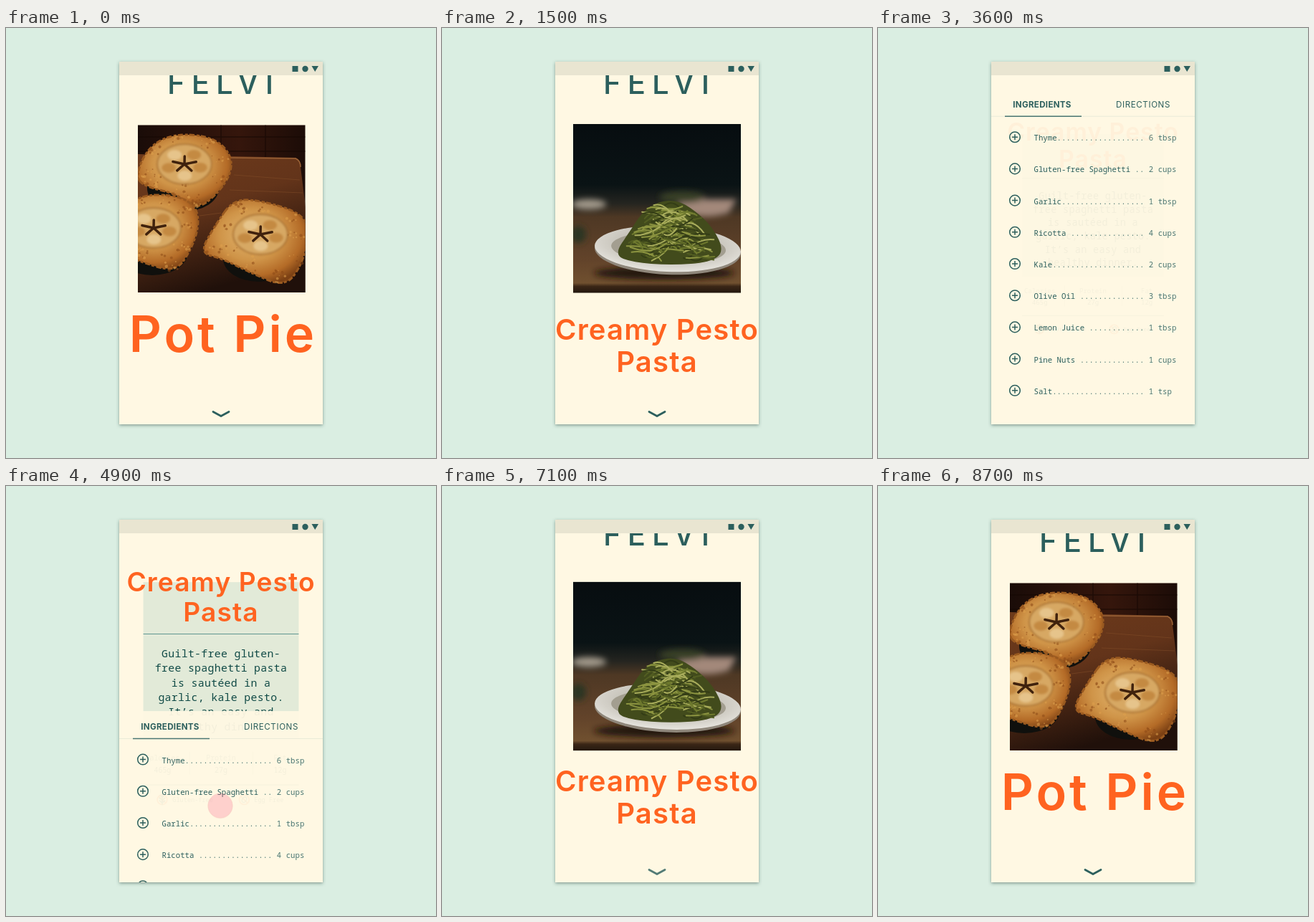
An HTML page that plays this animation: 600 by 600 pixels, repeating every 8800 ms.

```html
<!DOCTYPE html>
<html lang="en">
<head>
<meta charset="utf-8">
<title>Recipe app</title>
<style>
@property --page { syntax: "<number>"; inherits: true; initial-value: 0; }
@property --scroll { syntax: "<number>"; inherits: true; initial-value: 0; }
@property --open { syntax: "<number>"; inherits: true; initial-value: 0; }

html, body { margin: 0; width: 100%; height: 100%; overflow: hidden; background: #daeee2; }
svg.stage {
  display: block; width: 600px; height: 600px;
  --settle: cubic-bezier(.15, .6, .2, 1);
  --tint: clamp(0, var(--open) * 3, 1);
  --shrink: calc(1 - .163 * var(--open));
  animation: page 8.8s linear infinite, scroll 8.8s linear infinite, open 8.8s linear infinite;
}

@keyframes page {
  0%, 2.84% { --page: 0; }
  6.25% { --page: .6; animation-timing-function: var(--settle); }
  15.91%, 86.36% { --page: 1; }
  89.77% { --page: .4; animation-timing-function: var(--settle); }
  98.3%, 100% { --page: 0; }
}
@keyframes scroll {
  0%, 19.89% { --scroll: 0; }
  23.3% { --scroll: .35; animation-timing-function: var(--settle); }
  29.32%, 71.02% { --scroll: 1; }
  72.73% { --scroll: .9375; }
  75.57% { --scroll: .5; animation-timing-function: var(--settle); }
  82.95%, 100% { --scroll: 0; }
}
@keyframes open {
  0% { --open: 0; }
  32.39% { --open: 0; animation-timing-function: cubic-bezier(.3, 0, .1, 1); }
  44.32%, 51.7% { --open: 1; }
  55.68% { --open: .449; animation-timing-function: var(--settle); }
  64.77%, 100% { --open: 0; }
}
@keyframes touch {
  0%, 1.14% { transform: translate(400px, 388px); opacity: 0; }
  2.84% { transform: translate(400px, 388px); opacity: .9; }
  6.25% { transform: translate(215px, 388px); opacity: .8; }
  8.52% { transform: translate(180px, 388px); opacity: 0; }
  18.18% { transform: translate(300px, 488px); opacity: 0; }
  19.89% { transform: translate(300px, 488px); opacity: .9; }
  23.3% { transform: translate(300px, 384px); opacity: .8; }
  25% { transform: translate(300px, 350px); opacity: 0; }
  30.11% { transform: translate(237px, 536px); opacity: 0; }
  31.25%, 32.39% { transform: translate(237px, 536px); opacity: .9; }
  34.09% { transform: translate(237px, 536px); opacity: 0; }
  50% { transform: translate(299px, 198px); opacity: 0; }
  51.7% { transform: translate(299px, 198px); opacity: .9; }
  54.55% { transform: translate(299px, 375px); opacity: .9; }
  55.68% { transform: translate(299px, 446px); opacity: .22; }
  56.25% { transform: translate(299px, 455px); opacity: 0; }
  69.32% { transform: translate(300px, 252px); opacity: 0; }
  71.02% { transform: translate(300px, 252px); opacity: .9; }
  72.73% { transform: translate(300px, 271px); opacity: .92; }
  75.57% { transform: translate(300px, 400px); opacity: .8; }
  77.27% { transform: translate(300px, 440px); opacity: 0; }
  84.09% { transform: translate(268px, 388px); opacity: 0; }
  86.36% { transform: translate(268px, 388px); opacity: .9; }
  88.86% { transform: translate(404px, 388px); opacity: .8; }
  89.77% { transform: translate(453px, 388px); opacity: .2; }
  90.91%, 100% { transform: translate(470px, 388px); opacity: 0; }
}

text { font-family: Inter, sans-serif; font-optical-sizing: none; fill: #2c5f5d; }
.mid { text-anchor: middle; }
.title { font-weight: 600; fill: #ff6320; }
.mono { font-family: "Noto Sans Mono", "DejaVu Sans Mono", monospace; white-space: pre; }
.about { font-size: 16px; font-weight: 500; letter-spacing: .36px; fill: #104a46; }
.small { font-size: 10.7px; font-weight: 500; }
.light { font-weight: 300; fill: #4a7672; }
.tag { font-size: 9.25px; font-weight: 500; }
.ink { fill: none; stroke: #2c5f5d; }

.brand { transform: translateY(calc(var(--scroll) * -297px)); }
.pie-photo { transform: translateX(calc(var(--page) * -308px)); }
.pie-title { transform: translateX(calc(var(--page) * -386px)); }
.card {
  transform: translate(calc((1 - var(--page)) * 308px), calc(var(--scroll) * -12px)) scale(var(--shrink));
  transform-origin: 300px 300px;
}
.pasta-photo { opacity: calc(1.4 - var(--scroll) * 2); }
.pasta-title { transform: translate(calc((1 - var(--page)) * 386px), calc(var(--scroll) * -297px)); }
.pasta-title g { transform: scale(var(--shrink)); transform-origin: 300px 559px; }
.details {
  transform: translateY(calc((1 - var(--scroll)) * 240px)) scale(var(--shrink));
  transform-origin: 300px 244px;
  opacity: calc((var(--scroll) - .7) / .3);
}
.chevron { opacity: calc(1 - var(--scroll) * 6); }
.sheet { transform: translateY(calc(516px - var(--open) * 450px + (1 - var(--scroll)) * 320px)); }
.tabs { opacity: calc((var(--scroll) - .94) / .06); font-size: 10px; letter-spacing: .5px; }
.tab { transform: translate(calc(var(--x) + var(--tint) * var(--dx)), calc(20px + var(--tint) * 2px)) scale(calc(1 + var(--tint) * .16)); }
.bold { font-weight: 700; letter-spacing: .25px; opacity: var(--tint); }
.plain { opacity: calc(1 - var(--tint)); }
.on { opacity: var(--tint); }
.off { opacity: calc(1 - var(--tint)); }
.touch { animation: touch 8.8s linear infinite; }
</style>
</head>
<body>
<svg class="stage" viewBox="0 0 600 600">
  <defs>
    <clipPath id="screen"><rect x="158" y="66" width="284" height="487"/></clipPath>
    <clipPath id="pieFrame"><rect x="184" y="135.5" width="233.5" height="233.5"/></clipPath>
    <clipPath id="pastaFrame"><rect x="183" y="134" width="234" height="235.5"/></clipPath>
    <filter id="shadow" x="-10%" y="-10%" width="120%" height="120%">
      <feDropShadow dx="0" dy="1.5" stdDeviation="2" flood-color="#28463c" flood-opacity=".5"/>
    </filter>
    <filter id="soft" x="-30%" y="-60%" width="160%" height="220%"><feGaussianBlur stdDeviation="4"/></filter>
    <filter id="blur" x="-20%" y="-20%" width="140%" height="140%"><feGaussianBlur stdDeviation="1.6"/></filter>
    <radialGradient id="crust" cx=".46" cy=".42" r=".62">
      <stop offset="0" stop-color="#e3b873"/><stop offset=".5" stop-color="#cf9448"/>
      <stop offset=".8" stop-color="#b46b27"/><stop offset="1" stop-color="#7c4114"/>
    </radialGradient>
    <linearGradient id="board" x1="0" y1="0" x2=".35" y2="1">
      <stop offset="0" stop-color="#6d3a1b"/><stop offset=".45" stop-color="#63341a"/><stop offset="1" stop-color="#20100a"/>
    </linearGradient>
    <linearGradient id="wall" x1="0" x2="1">
      <stop offset="0" stop-color="#1a0c08"/><stop offset=".6" stop-color="#35160c"/><stop offset="1" stop-color="#1c0c07"/>
    </linearGradient>
    <linearGradient id="night" x1="0" y1="0" x2="0" y2="1">
      <stop offset="0" stop-color="#070d10"/><stop offset=".36" stop-color="#0a1315"/><stop offset=".47" stop-color="#252520"/>
      <stop offset=".55" stop-color="#4e3824"/><stop offset=".8" stop-color="#62432a"/><stop offset=".94" stop-color="#70502f"/>
      <stop offset=".96" stop-color="#3a2616"/><stop offset="1" stop-color="#23170e"/>
    </linearGradient>
    <radialGradient id="plate" cx=".5" cy=".4" r=".6">
      <stop offset="0" stop-color="#a9a498"/><stop offset=".75" stop-color="#d3d0c8"/><stop offset="1" stop-color="#e6e4de"/>
    </radialGradient>
  </defs>

  <rect x="158" y="47" width="284" height="506" fill="#fff8e3" filter="url(#shadow)"/>

  <g clip-path="url(#screen)">
    <text class="brand" x="225" y="92" font-size="42" font-weight="500" letter-spacing="9">FELVI</text>

    <g class="pie-photo"><g id="pies" clip-path="url(#pieFrame)">
      <rect x="184" y="135" width="234" height="235" fill="url(#wall)"/>
      <path d="M184 152H418M184 172H418M300 135V180M362 135V180" stroke="#140805" stroke-width="1.5" opacity=".6"/>
      <path d="M184 176L404 181Q412 184 411 194L418 250V370H184Z" fill="url(#board)"/>
      <path d="M310 181L404 182Q411 185 411 194" fill="none" stroke="#9a6236" stroke-width="1.5"/>
      <path d="M318 205L410 212M312 226L414 230M270 262L300 258" stroke="#85502a" opacity=".5"/>
    </g></g>

    <g class="card">
      <rect x="183" y="134" width="234" height="235.5" fill="#e2ead8"/>
      <g class="pasta-photo"><g clip-path="url(#pastaFrame)">
        <rect x="183" y="134" width="234" height="236" fill="url(#night)"/>
        <g filter="url(#soft)">
          <ellipse cx="205" cy="246" rx="24" ry="7" fill="#a39a8b"/>
          <path d="M325 239H411L400 258Q368 268 340 258Z" fill="#a3887a"/>
          <ellipse cx="335" cy="236" rx="32" ry="8" fill="#394126"/>
          <ellipse cx="190" cy="288" rx="11" ry="12" fill="#2c3423"/>
          <ellipse cx="310" cy="342" rx="98" ry="9" fill="#21150c"/>
        </g>
        <g transform="rotate(2.5 315 308)">
          <ellipse cx="315" cy="311" rx="102" ry="33" fill="#8f877b"/>
          <ellipse cx="315" cy="308" rx="102" ry="32" fill="url(#plate)"/>
          <ellipse cx="316" cy="307" rx="80" ry="22" fill="#a39e90"/>
        </g>
        <g id="noodles"></g>
      </g></g>
    </g>

    <text class="title pie-title mid" x="303" y="452" font-size="70" letter-spacing="4">Pot Pie</text>

    <g class="details" id="details">
      <path d="M183 203.5H417M183 430.8H417" stroke="#5f9690" stroke-width="1.2"/>
      <path d="M253 381V415M348 381V415" stroke="#b9cfbf"/>
      <g fill="none" stroke="#ff6320" stroke-width="1.7">
        <circle cx="211.500" cy="453" r="7.400"/><path d="M206 448L217 458"/>
        <circle cx="335" cy="453" r="7.400"/><path d="M330 448L340 458"/>
      </g>
      <path class="ink" d="M211.500 461V444M211.500 450L208 446M211.500 450L215 446M211.500 454L207 450M211.500 454L216 450M211.500 458L207 454M211.500 458L216 454" stroke-width="1.8"/>
      <ellipse class="ink" cx="335" cy="453" rx="3" ry="4.400" transform="rotate(28 335 453)" stroke-width="1.3"/>
      <text class="mono tag" x="227" y="456.500">Gluten-free</text>
      <text class="mono tag" x="350" y="456.500">Egg Free</text>
    </g>

    <g class="pasta-title"><g class="mid" font-size="40" letter-spacing="1.2">
      <text class="title" x="300" y="435">Creamy Pesto</text>
      <text class="title" x="300" y="480">Pasta</text>
    </g></g>

    <path class="chevron ink" d="M289 535.500L300 541.500L311 535.500" stroke-width="2.8" stroke-linecap="round" stroke-linejoin="round"/>

    <g class="sheet" id="sheet">
      <rect x="158" width="284" height="500" fill="#fff8e3" fill-opacity=".95"/>
      <path class="off" d="M158 .5H442" stroke="#e3e7d5"/>
      <g class="on">
        <path d="M158 38.500H442" stroke="#e9ead8"/>
        <path d="M177 38.500H284" stroke="#4a7672" stroke-width="1.5"/>
      </g>
      <g class="tabs mid">
        <g class="tab" style="--x: 237px; --dx: -8px">
          <text class="plain" y="3.600">INGREDIENTS</text><text class="bold" y="3.600">INGREDIENTS</text>
        </g>
        <g class="tab" style="--x: 363px; --dx: 7px"><text y="3.600">DIRECTIONS</text></g>
      </g>
    </g>

    <circle class="touch" r="17" fill="#fb3f78" stroke="#e0304f" stroke-width="1"/>
  </g>

  <rect x="158" y="47" width="284" height="19" fill="#e9e5d1"/>
  <g fill="#2c5f5d">
    <rect x="399.500" y="53" width="8" height="8"/><circle cx="417.500" cy="57" r="4.200"/><path d="M426.500 53H436L431.200 61Z"/>
  </g>
</svg>

<script>
const byId = id => document.getElementById(id);

function add(parent, name, attrs, text = "") {
  const el = document.createElementNS("http://www.w3.org/2000/svg", name);
  for (const key in attrs) el.setAttribute(key, attrs[key]);
  el.textContent = text;
  parent.append(el);
  return el;
}

let seed = 7;
function random(min, max) {
  seed = (seed * 16807) % 2147483647;
  return min + (max - min) * seed / 2147483647;
}

// Closed curve through the midpoints of a polygon.
function blob(points) {
  const mid = (a, b) => [(a[0] + b[0]) / 2, (a[1] + b[1]) / 2];
  const last = points[points.length - 1];
  return "M" + mid(last, points[0]) +
    points.map((p, i) => `Q${p} ${mid(p, points[(i + 1) % points.length])}`).join("") + "Z";
}

function drawPie(cx, cy, outline) {
  const pies = byId("pies"), d = blob(outline);
  add(pies, "ellipse", { cx: cx - 2, cy: cy + 34, rx: 50, ry: 32, fill: "#10100d" });
  add(pies, "path", { d, fill: "url(#crust)", stroke: "#9a5a20", "stroke-width": 3, "stroke-dasharray": "7 3 4 2" });
  for (let i = 0; i < 90; i++) {
    const angle = random(0, 6.28), r = random(.62, .9);
    const edge = outline[Math.floor(angle / 6.29 * outline.length)];
    add(pies, "circle", {
      cx: cx + (edge[0] - cx) * r + random(-9, 9), cy: cy + (edge[1] - cy) * r + random(-5, 5),
      r: random(.6, 2.2), fill: i % 2 ? "#dfa04e" : "#8c4a17", opacity: .55
    });
  }
  const top = add(pies, "g", { filter: "url(#blur)" });
  add(top, "ellipse", { cx, cy, rx: 38, ry: 28, fill: "#d7a863", stroke: "#a9702f", "stroke-width": 2 });
  for (let i = 0; i < 5; i++) {
    const angle = i * 1.257 + .3;
    add(top, "ellipse", { cx: cx + 23 * Math.cos(angle), cy: cy + 16 * Math.sin(angle), rx: 10, ry: 7, fill: i % 2 ? "#e6c48b" : "#c48a42" });
  }
  for (let i = 0; i < 5; i++) {
    const angle = i * 1.257 - .3;
    add(pies, "path", {
      d: `M${cx} ${cy}l${17 * Math.cos(angle)} ${11 * Math.sin(angle)}`,
      stroke: "#40220d", "stroke-width": 3.5, "stroke-linecap": "round"
    });
  }
}

drawPie(249, 190, [[180, 208], [198, 166], [235, 147], [290, 152], [317, 180], [310, 215], [268, 256], [240, 232], [196, 222]]);
drawPie(206, 279, [[160, 260], [184, 234], [232, 232], [264, 246], [270, 275], [257, 312], [236, 341], [184, 325], [150, 310]]);
drawPie(355, 288, [[318, 238], [362, 242], [416, 260], [421, 290], [414, 328], [390, 362], [340, 341], [300, 321], [270, 314], [292, 275]]);

const mound = [[240, 316], [262, 284], [280, 256], [302, 242], [328, 240], [352, 254], [378, 278], [394, 312], [374, 327], [320, 331], [264, 327]];
const noodles = byId("noodles");
add(noodles, "path", { d: blob(mound), fill: "#424b1c" });
const greens = ["#8c9440", "#6f7a2e", "#a9ad5c", "#535e22", "#343d16"];
for (let i = 0; i < 130; i++) {
  const y = random(251, 322), half = (y - 236) * .72 + 8;
  const x = 317 + random(-.85, .85) * half;
  const dx = random(6, 20), lift = random(-18, 10), tilt = random(-12, 12);
  add(noodles, "path", {
    d: `M${x - dx} ${y + tilt / 2}q${dx} ${lift} ${2 * dx} ${-tilt}`,
    fill: "none", stroke: greens[i % greens.length], "stroke-width": 2, "stroke-linecap": "round"
  });
}

const details = byId("details");
["Guilt-free gluten-", "free spaghetti pasta", "is sautéed in a", "garlic, kale pesto.", "It’s an easy and", "healthy dinner."]
  .forEach((line, i) => add(details, "text", { class: "mono about mid", x: 300, y: 238.5 + i * 22 }, line));
[[212, "Calories", "465g"], [300, "Protein", "27g"], [389, "Fat", "12g"]].forEach(([x, label, value]) => {
  add(details, "text", { class: "mono small light mid", x, y: 393.5 }, label);
  add(details, "text", { class: "mono small mid", x, y: 412.5 }, value);
});

const ingredients = [
  ["Thyme", "6 tbsp"], ["Gluten-free Spaghetti ", "2 cups"], ["Garlic", "1 tbsp"], ["Ricotta ", "4 cups"],
  ["Kale", "2 cups"], ["Olive Oil ", "3 tbsp"], ["Lemon Juice ", "1 tbsp"], ["Pine Nuts ", "1 cups"], ["Salt", "1 tsp "]
];
ingredients.forEach(([name, amount], i) => {
  const y = 67.5 + i * 44.2, sheet = byId("sheet");
  add(sheet, "circle", { class: "ink", cx: 191, cy: y, r: 7.3, "stroke-width": 1.5 });
  add(sheet, "path", { class: "ink", d: `M187 ${y}h8m-4 -4v8`, "stroke-width": 1.5 });
  const row = add(sheet, "text", { class: "mono small", x: 217.5, y: y + 5 }, name);
  add(row, "tspan", { class: "light" }, ".".repeat(24 - name.length) + " " + amount);
});
</script>
</body>
</html>
```
